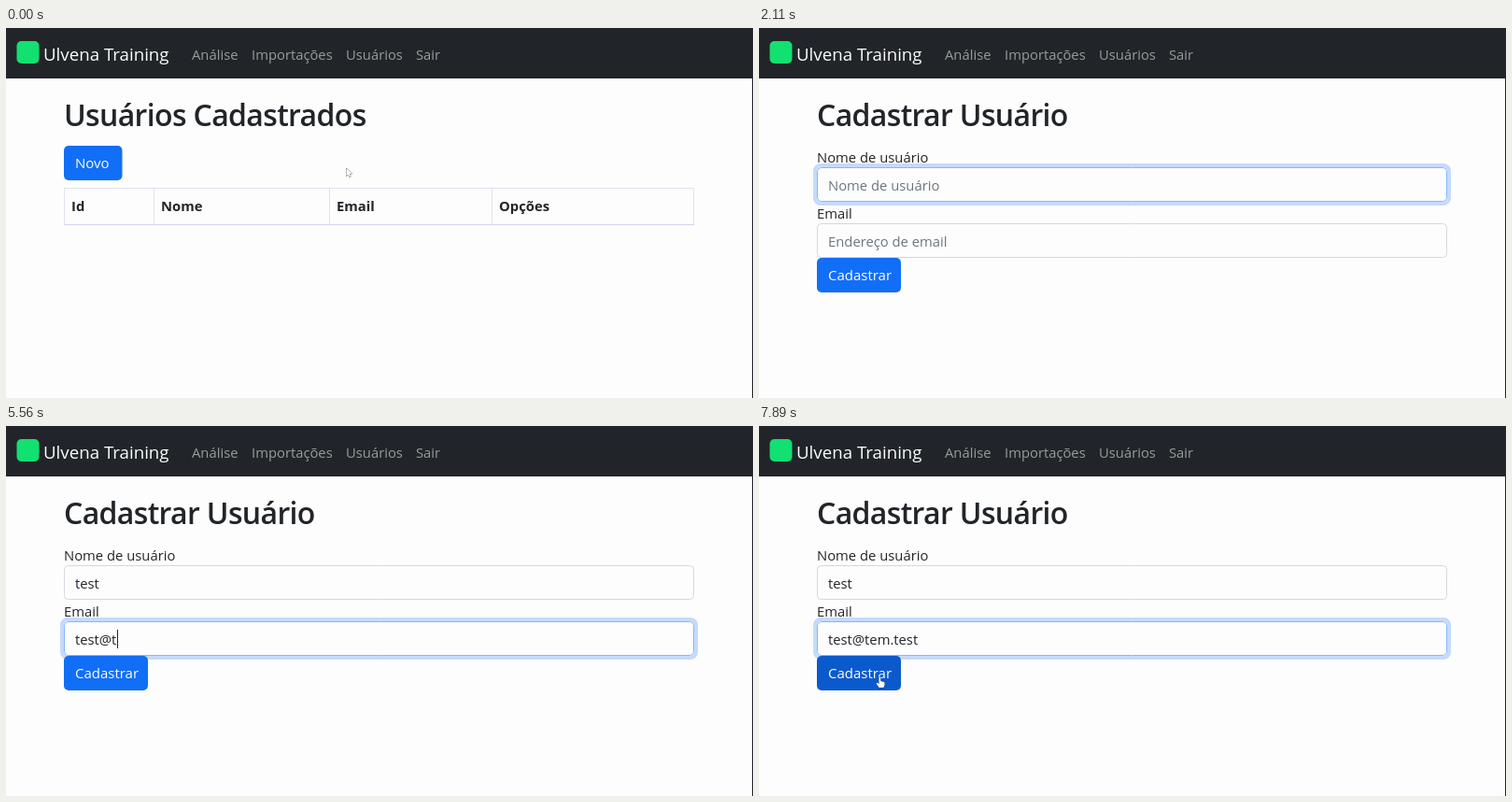
Recreate the animation shown at these times as an HTML page with a canvas. Size 800 px wide and 396 px high, loop 8 s.

```html
<!DOCTYPE html>
<html lang="pt-BR">
<head>
<meta charset="utf-8">
<title>Usuários</title>
<style>
  html, body { margin: 0; width: 100%; height: 100%; overflow: hidden; background: #fdfdfd; }
  canvas { display: block; width: 800px; height: 396px; }
</style>
</head>
<body>
<canvas id="stage" width="800" height="396"></canvas>
<script>
const ctx = document.getElementById('stage').getContext('2d');
const LOOP = 8000, FPS = 9;
const FAMILY = '"Open Sans", "Noto Sans", sans-serif';
const C = {
  page: '#fdfdfd', field: '#fdfdfd', bar: '#212529', ink: '#212529',
  link: '#999b9d', hint: '#6c757d', line: '#e0e1ec', rule: '#d4d3ec',
  blue: [17, 110, 247], hover: [11, 90, 205],
  edge: [212, 216, 224], edgeFocus: [134, 183, 254], green: '#12e070'
};

const clamp = v => Math.max(0, Math.min(1, v));
const mix = (a, b, k) => a + (b - a) * k;
const blend = (a, b, k) => `rgb(${a.map((v, i) => Math.round(mix(v, b[i], k)))})`;
const ease = k => k * k * (3 - 2 * k);
const span = (t, a, b) => clamp((t - a) / (b - a));

function text(str, x, y, color, size = 14.8, weight = 400, spacing = 0) {
  ctx.font = `${weight} ${size}px ${FAMILY}`;
  ctx.letterSpacing = spacing + 'px';
  ctx.fillStyle = color;
  ctx.fillText(str, x, y);
  return ctx.measureText(str).width;
}

function rect(x, y, w, h, color) {
  ctx.fillStyle = color;
  ctx.fillRect(x, y, w, h);
}

function box(x, y, w, h, r, fill, stroke, width = 1) {
  ctx.beginPath();
  ctx.roundRect(x, y, w, h, r);
  if (fill) { ctx.fillStyle = fill; ctx.fill(); }
  if (stroke) { ctx.strokeStyle = stroke; ctx.lineWidth = width; ctx.stroke(); }
}

function ring(x, y, w, h, color, k) {
  if (k <= 0) return;
  const d = 4 * k;
  box(x - d / 2, y - d / 2, w + d, h + d, 6, null, color, d);
}

function button(label, y, w, hover, focus = 0) {
  ring(62, y, w, 37, '#98c1fe', focus);
  box(62, y, w, 37, 5, blend(C.blue, C.hover, hover));
  text(label, 74, y + 24, '#fdfdfd', 15);
}

function input(y, value, hint, focus, caret) {
  ring(62, y, 675, 37, '#c5dafd', focus);
  box(62.5, y + .5, 674, 36, 4, C.field, blend(C.edge, C.edgeFocus, clamp(focus * 2)));
  const w = text(value || hint, 74, y + 24.5, value ? C.ink : C.hint);
  if (caret) rect(Math.round(74 + (value ? w + .5 : 0)), y + 9, 1, 20, C.ink);
}

function path(points, fill, stroke) {
  ctx.beginPath();
  points.forEach(([x, y]) => ctx.lineTo(x, y));
  ctx.closePath();
  ctx.fillStyle = fill;
  ctx.strokeStyle = stroke;
  ctx.lineWidth = .8;
  ctx.stroke();
  ctx.fill();
}

// The hot spot of every pointer is at x, y
function pointer(kind, x, y) {
  ctx.save();
  ctx.translate(x, y);
  if (kind === 'arrow') {
    path([[0, 0], [0, 8.5], [2, 6.8], [3.3, 9.6], [4.6, 9], [3.4, 6.2], [6, 6]], '#fdfdfd', '#4a4a4e');
  } else if (kind === 'hand') {
    path([[-1, 0], [.6, 0], [.8, 4], [5, 5.2], [5, 8.5], [3.8, 11], [-.8, 11], [-4, 6.6], [-3, 5.8], [-1, 7]],
      '#fdfdfd', '#2c3440');
  } else {
    rect(0, -5, 1, 10, '#88888c');
    rect(-1, -5, 3, 1, '#88888c');
    rect(-1, 5, 3, 1, '#88888c');
  }
  ctx.restore();
}

function glide(kind, from, to, k) {
  const e = ease(k);
  pointer(kind, mix(from[0], to[0], e), mix(from[1], to[1], e));
}

function navbar() {
  rect(0, 0, 800, 54, C.bar);
  rect(799, 54, 1, 342, C.bar);
  box(11.5, 14, 24, 24, 5, C.green);
  text('Ulvena Training', 40, 35, '#fdfdfd', 18.7);
  [['Análise', 199], ['Importações', 263], ['Usuários', 364], ['Sair', 439]]
    .forEach(([label, x]) => text(label, x, 33.5, C.link));
}

const heading = str => text(str, 62, 104.5, C.ink, 32, 600, -.65);

function listPage(n) {
  heading('Usuários Cadastrados');
  button('Novo', 126, 62.5, span(n, 4, 6), span(n, 5, 7));
  [62, 158, 346, 520, 736].forEach(x => rect(x, 171, 1, 40, C.line));
  rect(62, 171, 675, 1, C.line);
  rect(62, 210, 675, 1, C.rule);
  [['Id', 70], ['Nome', 166], ['Email', 354], ['Opções', 528]]
    .forEach(([label, x]) => text(label, x, 196, C.ink, 14.8, 700));
  const k = span(n, 0, 5);
  glide(k < 1 ? 'arrow' : 'hand', [364.5, 150], [103, 151.5], k);
}

// Each entry is the tick at which the next letter appears
const NAME = { value: 'test', keys: [22, 23, 26, 27] };
const MAIL = { value: 'test@tem.test', keys: [37, 38, 40, 40, 47, 50, 52, 53, 55, 56, 58, 59, 60] };
const typed = (f, n) => f.value.slice(0, f.keys.filter(k => k <= n).length);
const within = (n, ...ranges) => ranges.some(([a, b]) => n >= a && n < b);

function formPage(n) {
  heading('Cadastrar Usuário');
  text('Nome de usuário', 62, 143.5, C.ink);
  text('Email', 62, 204, C.ink);
  const nameFocus = n < 31 ? span(n, 16, 18) : n < 32 ? .3 : 0;
  const mailFocus = n < 32 ? 0 : span(n, 30, 33);
  input(149, typed(NAME, n), 'Nome de usuário', nameFocus, within(n, [17, 19], [22, 31]));
  input(209, typed(MAIL, n), 'Endereço de email', mailFocus, within(n, [31, 35], [37, 45], [47, 67]));
  button('Cadastrar', 246, 90, span(n, 68, 70));
  if (n < 17) glide('beam', [103, 155], [128, 167], span(n, 11, 17));
  if (n >= 65) glide(n < 69 ? 'arrow' : 'hand', [182, 299], [129.5, 269], span(n, 65, 70));
}

function frame(now) {
  const n = Math.floor(((now % LOOP) + 5) * FPS / 1000) % (LOOP * FPS / 1000);
  rect(0, 0, 800, 396, C.page);
  navbar();
  (n < 8 ? listPage : formPage)(n);
}

const start = performance.now();
function tick() {
  frame(performance.now() - start);
  requestAnimationFrame(tick);
}
tick();
</script>
</body>
</html>
```
